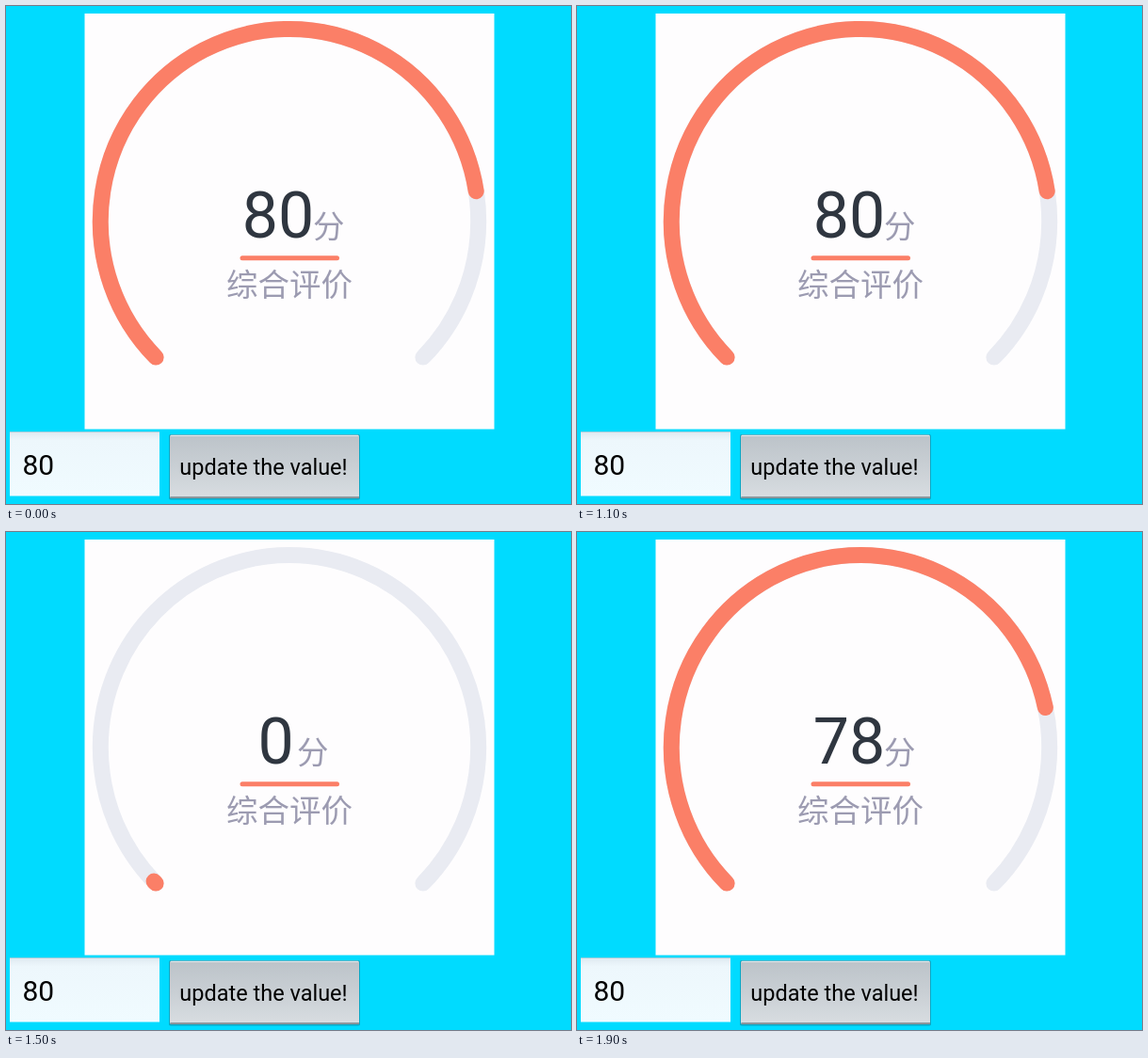
Write an HTML page that moves like this. It is 600x529 px and loops after 2000 ms.

```html
<!DOCTYPE html>
<html lang="en">
<head>
<meta charset="utf-8">
<title>Score gauge</title>
<style>
  html, body { margin: 0; width: 100%; height: 100%; overflow: hidden; background: #00dbff; }
  svg { display: block; width: 100vw; height: 100vh; }
  text { font-family: Roboto, "Noto Sans CJK SC", "Noto Sans CJK", sans-serif; }
  .cjk { font-family: "Noto Sans CJK SC", "Noto Sans CJK", sans-serif; font-size: 33.5px; font-weight: 400; fill: #9c9bb1; }
  .arc { fill: none; stroke-width: 17; stroke-linecap: round; }
</style>
</head>
<body>
<svg viewBox="0 0 600 529" lang="zh-CN">
  <defs>
    <linearGradient id="steel" x1="0" y1="0" x2="0" y2="1">
      <stop offset="0" stop-color="#bcc3c9"/>
      <stop offset=".5" stop-color="#c9cfd4"/>
      <stop offset="1" stop-color="#d8dde1"/>
    </linearGradient>
    <linearGradient id="field" x1="0" y1="0" x2="0" y2="1">
      <stop offset="0" stop-color="#dfe9f0"/>
      <stop offset=".14" stop-color="#edf7fc"/>
      <stop offset="1" stop-color="#f0fbff"/>
    </linearGradient>
  </defs>
  <rect width="600" height="529" fill="#00dbff"/>
  <rect x="83.5" y="8" width="435" height="441.5" fill="#fefdfe"/>

  <path id="track" class="arc" stroke="#e9ebf2"/>
  <path id="bar" class="arc" stroke="#fb7f67"/>
  <text id="score" y="246" font-size="68" text-anchor="middle" fill="#2f3640"></text>
  <text id="unit" class="cjk" y="246">分</text>
  <path d="M251 267.7H351.5" stroke="#fb7f67" stroke-width="5" stroke-linecap="round"/>
  <text class="cjk" x="301" y="308" text-anchor="middle">综合评价</text>

  <rect x="4" y="452" width="159" height="68.5" fill="url(#field)"/>
  <path d="M4 452.5H163" stroke="#a9cfdc"/>
  <text x="17.5" y="498" font-size="30" fill="#000">80</text>

  <rect x="173" y="455" width="203" height="69.5" rx="2" fill="#087f96" opacity=".55"/>
  <rect id="button" x="174" y="455.5" width="201" height="67" rx="1.5"/>
  <path id="shine" d="M175 456.5H374" stroke="#e2e7ea"/>
  <path id="edge" d="M174.5 522H375"  stroke-width="2"/>
  <text x="273.5" y="498" font-size="23.5" text-anchor="middle" fill="#000">update the value!</text>
</svg>
<script>
  const LOOP = 2000, STEP = 100, PRESS = 1400, RELEASE = 1500, GOAL = 80;
  const $ = id => document.getElementById(id);
  const set = (id, attrs) => {
    for (const name in attrs) $(id).setAttribute(name, attrs[name]);
  };

  const cx = 301, cy = 228.7, rx = 200.7, ry = 204.2;
  const point = deg => {
    const a = deg * Math.PI / 180;
    return `${cx + rx * Math.cos(a)} ${cy + ry * Math.sin(a)}`;
  };

  // The gauge covers 270 degrees, from lower left to lower right.
  function arc(value) {
    const sweep = value * 2.7;
    return `M${point(135)}A${rx} ${ry} 0 ${sweep > 180 ? 1 : 0} 1 ${point(135 + sweep)}`;
  }

  // Ease in and out after the button is released.
  function valueAt(time) {
    if (time < RELEASE) return GOAL;
    const k = (time - RELEASE) / STEP;
    const p = Math.min(1, 0.039 + 0.2025 * k + 0.0048 * k * k);
    return GOAL * (1 - Math.cos(Math.PI * p)) / 2;
  }

  function draw(time) {
    const value = valueAt(time);
    const shown = Math.floor(value);
    const single = shown < 10;
    const pressed = time >= PRESS && time < RELEASE;

    set("bar", { d: arc(value) });
    $("score").textContent = shown;
    set("score", { x: single ? 286.5 : 289 });
    set("unit", { x: single ? 309 : 326 });
    set("button", { fill: pressed ? "#ff9f0c" : "url(#steel)" });
    set("shine", { stroke: pressed ? "#ffb43c" : "#e2e7ea" });
    set("edge", { stroke: pressed ? "#c47a10" : "#8b969c" });
  }

  set("track", { d: arc(100) });

  const start = performance.now();
  function tick() {
    const time = (performance.now() - start) % LOOP;
    draw(Math.floor(time / STEP) * STEP);
    requestAnimationFrame(tick);
  }
  tick();
</script>
</body>
</html>
```
